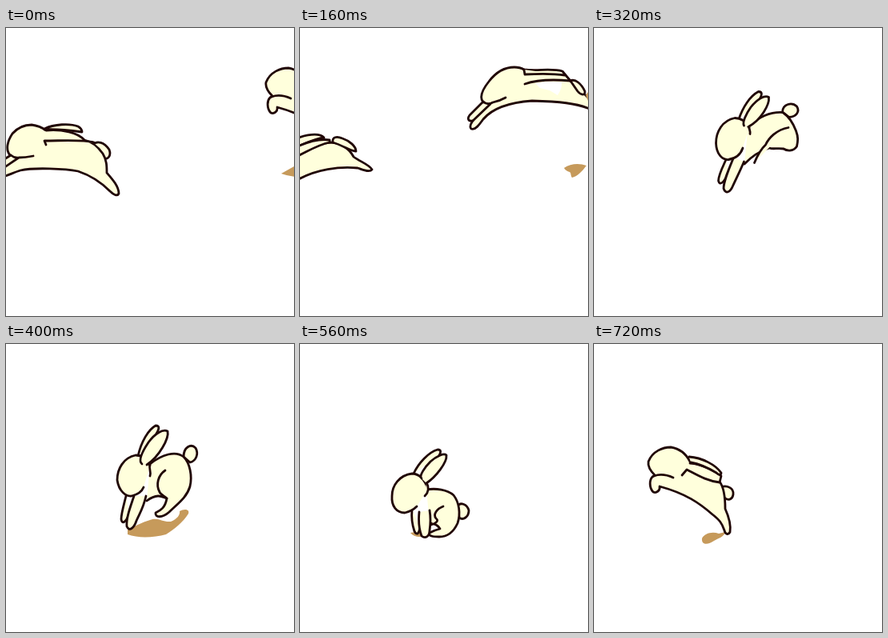
These frames come from a looping animation (360x360 px, 0.8 s). An HTML page:

```html
<!DOCTYPE html>
<html lang="en">
<head>
<meta charset="utf-8">
<title>Running rabbit</title>
<style>
html, body { margin: 0; width: 100%; height: 100%; overflow: hidden; background: #fff; }
svg { display: block; width: 100vw; height: 100vh; }
.rabbit { fill: #ffffdc; stroke: #200606; stroke-width: 2.8; stroke-linecap: round; stroke-linejoin: round; }
.shade { fill: #c69a5b; }
.gap { fill: #fff; }
</style>
</head>
<body>
<svg id="stage" viewBox="0 0 360 360"></svg>
<script>
const STEP = 80;

// Each pose is a list of paths, painted back to front.
const launch = [
  'M159 179C166 176 175 180 174 188C173 195 167 196 163 192Z',
  'M76 164C70 158 67 153 68 147C73 134 86 129 96 129C108 131 115 137 120 147C135 150 148 158 157 172C163 180 164 193 164 206C169 217 171 228 170 235C168 239 164 238 163 233C160 224 157 220 148 213C132 199 115 187 82 178C83 183 78 187 74 185C69 180 69 170 73 166Z',
  'M75 165C83 162 90 163 99 167',
  'M120 149C135 150 150 158 159 165L157 173C140 171 128 163 116 157L110 164',
  'M119 141C135 142 152 151 159 161C159 164 156 164 153 161C143 155 132 150 121 148'
];
const leap = [
  'M108 146C114 140 123 143 129 152C132 160 127 165 122 163C117 158 113 150 108 146Z',
  'M5 159C-1 152 2 141 8 132C15 124 24 121 32 121C40 122 46 125 50 128C70 126 90 131 98 140C108 142 116 150 121 157C126 165 126 173 126 181C133 189 141 198 141 207C139 211 134 208 130 204C117 191 105 184 90 179C75 176 35 174 18 178C8 181 0 186 -6 186C-11 183 -10 179 -6 177C-12 178 -13 172 -10 169L6 159Z',
  'M6 159Q11 163 16 162Q24 162 34 160M-6 177L16 162',
  'M48 126C60 120 80 119 90 123Q95 126 95 130C80 128 62 126 48 127',
  'M50 146L48 141C70 141 95 139 110 143'
];
const glide = [
  'M229 93C224 87 228 77 236 67C245 55 256 49 268 49Q275 49 280 52C297 54 315 50 328 54L338 66C348 72 352 80 357 84C365 92 376 98 378 105C377 110 370 107 362 101C345 94 325 92 290 91C262 93 240 101 229 114C224 121 219 128 214 126C211 123 214 119 216 116C210 117 209 113 212 109L229 92Z',
  'M229 92Q234 97 241 93Q250 91 257 87M216 116L238 95',
  'M280 52L281 58C300 57 318 57 331 59',
  'M281 70C295 65 315 64 338 66',
  'M338 66C344 63 352 70 356 79C357 85 351 84 347 79Z'
];
const dive = [
  'M-5 160C10 155 20 144 38 143C52 144 61 150 67 161C75 167 87 171 90 177C87 181 78 177 72 175C50 173 20 176 -5 191Z',
  'M-5 138C10 133 24 131 30 137C20 138 10 143 -5 149Z',
  'M-5 149C10 142 24 138 37 140L37 143C22 146 10 154 -5 161Z',
  'M41 143C40 136 46 135 53 138C62 141 70 148 70 154C64 155 55 147 41 143Z'
];
// reach, land and sit share one structure so they can be blended:
// tail, far paw, body, near paw, far ear, head, neck, near ear, haunch
const reach = [
  'M249 69C250 60 264 61 270 66C274 72 268 76 258 75Z',
  'M180 139C174 147 167 156 167 163C169 169 175 164 181 152',
  'M205 98C215 84 230 76 250 70C258 73 266 76 275 79C285 81 296 82 303 86C303 92 295 90 287 91C265 91 250 99 237 107C222 117 210 130 200 144',
  'M189 134C181 150 174 165 173 173C175 182 181 180 184 174C189 163 193 154 200 144',
  'M197 88C203 76 212 63 224 57C229 57 229 61 226 66',
  'M208 97C203 88 197 86 190 86C174 89 166 103 166 118C165 132 171 139 179 139C190 138 197 131 200 121',
  'M207 95C209 96 210 98 210 100',
  'M205 94C205 90 210 80 214 75C222 66 230 61 235 64C235 74 226 89 210 96',
  'M287 91C265 91 250 99 237 107C222 117 210 130 200 144'
];
const land = [
  'M222 141C222 129 231 124 237 130C241 137 238 146 230 148Z',
  'M150 190C147 202 144 212 144 219C145 226 150 223 154 212',
  'M180 150C195 138 212 133 222 141C230 149 233 165 230 178C226 192 214 200 204 210C195 218 186 217 187 211C193 208 199 205 201 193C194 190 188 187 176 196',
  'M160 190C155 205 150 218 151 228C154 235 160 230 163 221C168 210 172 204 175 190',
  'M165 140C169 122 178 107 187 102C193 102 191 107 188 112',
  'M180 152C175 142 168 139 162 139C147 142 139 156 139 170C141 184 150 191 157 190C165 188 170 184 172 179',
  'M180 150C178 156 182 160 180 165',
  'M170 150C165 146 170 135 178 123C186 112 196 106 202 109C204 118 192 140 176 151',
  'M199 158C190 164 187 176 192 185C193 188 198 190 201 193'
];
const sit = [
  'M197 203C200 197 209 200 211 208C211 216 204 221 199 217Z',
  'M140 207C139 217 141 228 143 234C146 240 149 237 150 228',
  'M158 182C170 180 184 182 192 189C199 198 201 212 197 224C192 235 184 241 174 241C166 241 160 240 162 236C167 233 171 232 175 231C172 226 168 224 162 224',
  'M149 210C148 220 149 232 152 240C157 244 162 240 162 233C163 226 164 220 162 208',
  'M142 162C148 149 161 135 172 132C177 132 176 136 174 139',
  'M160 181C155 168 148 162 140 162C124 164 115 177 115 190C114 203 121 211 131 211C139 209 143 206 146 203',
  'M158 173C162 180 161 185 156 190',
  'M152 168C148 165 157 153 163 147C171 140 180 136 183 139C184 148 170 166 158 174',
  'M179 203C171 206 166 213 170 218C174 221 170 224 164 226'
];
const rise = [
  'M181 194C184 187 194 190 195 198C194 206 188 209 183 205Z',
  'M125 162C145 162 168 172 178 186C186 200 184 215 180 226C178 238 168 243 164 239C162 234 168 230 168 222C158 216 148 206 135 200C128 205 124 214 118 216C111 216 112 208 116 198Z',
  'M124 151C134 141 148 134 158 135C160 138 158 140 156 142',
  'M136 166C131 154 122 149 112 149C98 151 90 163 90 174C92 187 102 193 110 191C118 189 122 186 125 182',
  'M128 153C140 144 156 140 165 143C164 150 150 158 136 164'
];
const foot = ['M-3 178C4 174 10 174 15 177C14 182 6 185 -3 192'];

function blend(a, b, k = 0.5) {
  return a.map((path, i) => {
    const to = b[i].match(/-?\d+/g);
    let n = 0;
    return path.replace(/-?\d+/g, v => +v + (to[n++] - v) * k);
  });
}

const group = (cls, paths, x = 0, y = 0) =>
  `<g class="${cls}" transform="translate(${x} ${y})">${paths.map(d => `<path d="${d}"/>`).join('')}</g>`;
const rabbit = (pose, x, y) => group('rabbit', pose, x, y);
const shade = d => group('shade', [d]);

const scenes = [
  shade('M344 182L362 172V186Q352 185 344 182Z') + rabbit(leap) + rabbit(launch, 257, -79),
  shade('M333 179L362 166V186L341 190Q335 187 333 179Z') + rabbit(glide, -259, 85) + rabbit(leap, 261, -84),
  shade('M330 175C338 169 350 169 358 172C353 179 346 186 340 187C338 184 339 181 337 180C334 179 332 178 330 175Z') +
    rabbit(dive) + rabbit(glide) +
    group('gap', ['M294 69L310 67L327 68Q328 75 322 84L312 78L300 75Z']) + shade('M357 84L360 80V91Z'),
  rabbit(foot) + rabbit(reach),
  rabbit(blend(reach, land)),
  shade('M152 232C160 228 170 223 180 220C190 216 195 223 206 222C214 219 218 213 217 209C222 206 230 206 228 212C222 222 210 232 200 238C185 242 165 243 152 238Z') + rabbit(land),
  shade('M145 234C155 229 180 228 200 224C196 236 165 244 145 238Z') + rabbit(blend(land, sit)),
  shade('M138 236C145 234 152 236 155 240C149 242 142 241 138 236Z') + rabbit(sit),
  shade('M124 241C134 236 152 236 166 238C158 245 134 248 124 244Z') + rabbit(rise),
  shade('M135 243C138 237 147 234 156 237L164 235C163 241 155 243 150 246C143 251 134 252 135 243Z') + rabbit(launch)
];

const stage = document.getElementById('stage');
stage.innerHTML = scenes.map(s => `<g display="none">${s}</g>`).join('');
const layers = [...stage.children];
const start = performance.now();
let shown = -1;

function draw() {
  const i = Math.floor((performance.now() - start) / STEP) % layers.length;
  if (i !== shown) {
    layers.forEach((g, n) => g.setAttribute('display', n === i ? 'inline' : 'none'));
    shown = i;
  }
  requestAnimationFrame(draw);
}
draw();
</script>
</body>
</html>
```
